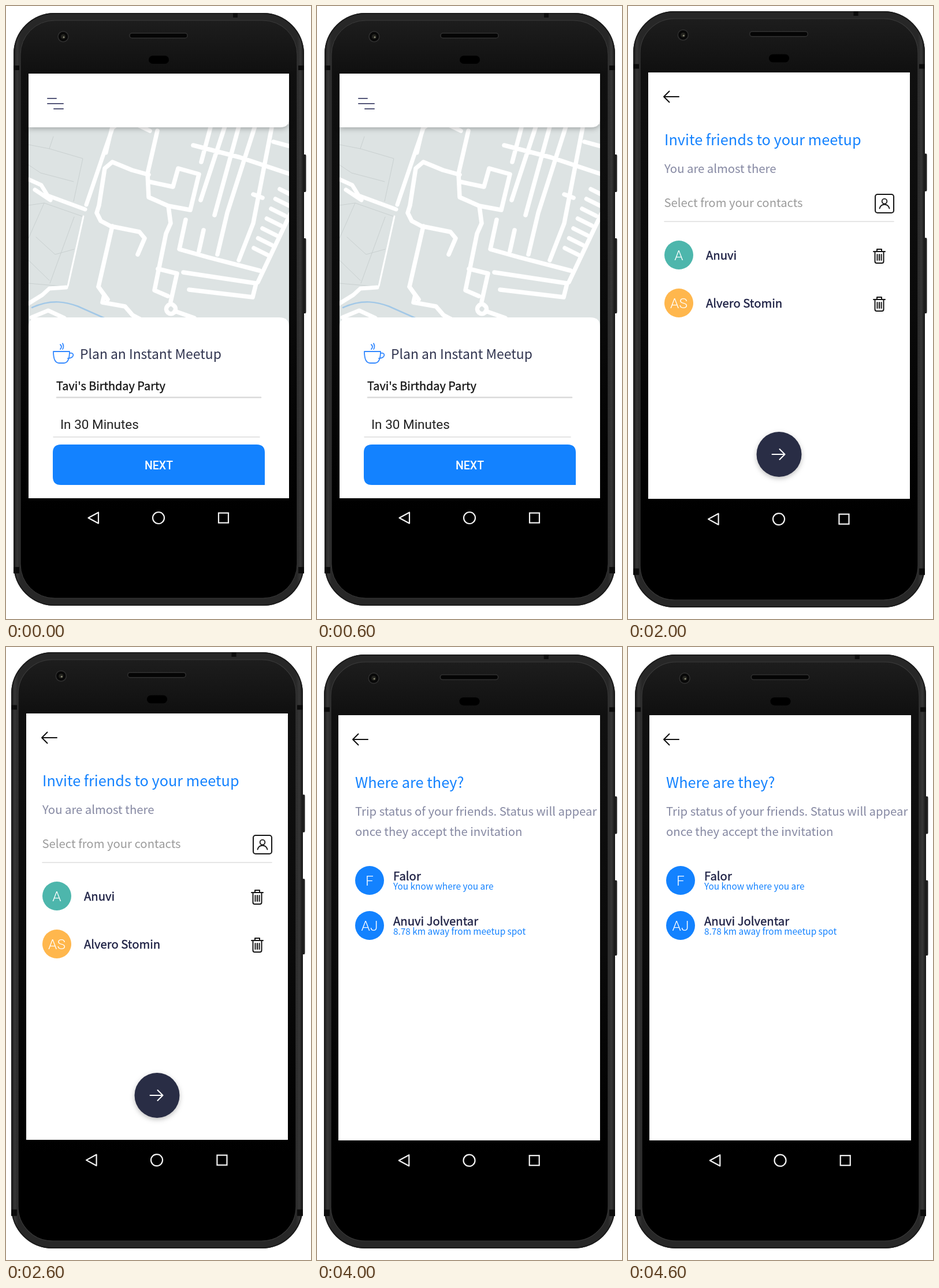
An HTML page that plays this animation: 528x1061 px, repeating every 5 s.

```html
<!DOCTYPE html>
<html lang="en">
<head>
<meta charset="utf-8">
<title>Meetup app walkthrough</title>
<style>
html, body { margin: 0; width: 100%; height: 100%; overflow: hidden; background: #fff; }
#stage { display: block; font-family: "Noto Sans CJK SC", "Noto Sans CJK JP", "Noto Sans CJK", "Open Sans", sans-serif; }
text { stroke-width: 0; }
.r { font-family: Roboto, sans-serif; }
.l { font-weight: 300; }
.m { font-weight: 500; }
.k { stroke-width: .4px; }
.b { font-weight: 700; stroke-width: .8px; }
.mid { text-anchor: middle; }
.end { text-anchor: end; }
.place { font-family: Roboto, sans-serif; stroke: #e6ebeb; stroke-width: 3px; paint-order: stroke; }
.street { font-family: Roboto, sans-serif; stroke: #eef1f1; stroke-width: 3px; paint-order: stroke; }
.line { fill: none; stroke-linecap: round; stroke-linejoin: round; }
.shadow { filter: drop-shadow(0 3px 4px rgba(0, 0, 0, .25)); }
</style>
</head>
<body>
<svg id="stage" width="528" height="1061" viewBox="0 0 528 1061">
  <defs>
    <linearGradient id="glass" x2="0" y2="1">
      <stop offset="0" stop-color="#1d1d1d"/><stop offset=".09" stop-color="#101010"/>
      <stop offset=".5" stop-color="#0a0a0a"/><stop offset=".85" stop-color="#000"/>
    </linearGradient>
    <linearGradient id="rim">
      <stop offset="0" stop-color="#171717"/><stop offset=".012" stop-color="#363636"/>
      <stop offset=".025" stop-color="#272727"/><stop offset=".975" stop-color="#272727"/>
      <stop offset=".988" stop-color="#363636"/><stop offset="1" stop-color="#171717"/>
    </linearGradient>
    <g id="phone">
      <path d="M514 257h4q1.500 0 1.500 3v59q0 3-1.500 3h-4zM514 402h4q1.500 0 1.500 3v124q0 3-1.500 3h-4z" fill="#202020"/>
      <rect x="13" y="12" width="503" height="1026" rx="71" fill="url(#rim)"/>
      <rect x="14" y="13" width="501" height="1024" rx="70" fill="none" stroke="#1b1b1b" stroke-width="2"/>
      <path d="M13 103h10v8H13zM506 103h10v8h-10zM13 971h10v11H13zM506 971h10v11h-10zM393 12h8v8h-8z" fill="#0c0c0c"/>
      <rect x="25" y="25" width="479" height="1000" rx="59" fill="url(#glass)" stroke="#3b3b3b"/>
      <rect x="214" y="47" width="100" height="8.5" rx="4" fill="#050505" stroke="#303030" stroke-width="1.5"/>
      <rect x="247" y="86" width="35" height="14" rx="7" fill="#000"/>
      <circle cx="99" cy="53" r="9" fill="#080808" stroke="#303030" stroke-width="1.5"/>
      <circle cx="99" cy="53" r="4" fill="#24241f"/><circle cx="100" cy="54" r="1.5" fill="#8b8a76"/>
      <g fill="none" stroke="#f2f2f2" stroke-width="2.200">
        <path d="M142.500 886L160 876.500V895.500Z" stroke-linejoin="round"/>
        <circle cx="264" cy="886" r="10"/><rect x="368" y="877.500" width="17" height="17"/>
      </g>
    </g>
  </defs>
</svg>
<script>
const BLUE = '#1382ff', INK = '#292d45', MUTED = '#8588a2', LAND = '#dde3e3', NAVY = '#1d2044';
const TITLE = 25.3, BODY = 20.3, SMALL = 15.4;

const text = (x, y, size, fill, str, cls = '', more = '') =>
  `<text x="${x}" y="${y}" font-size="${size}" fill="${fill}" stroke="${fill}" class="${cls}" ${more}>${str}</text>`;
const line = (d, stroke = '#fff', width = 7, more = '') =>
  `<path class="line" d="${d}" stroke="${stroke}" stroke-width="${width}" ${more}/>`;
const fill = (d, color, more = '') => `<path d="${d}" fill="${color}" ${more}/>`;
const disc = (x, y, r, color, more = '') => `<circle cx="${x}" cy="${y}" r="${r}" fill="${color}" ${more}/>`;
const rect = (x, y, w, h, color, more = '') =>
  `<rect x="${x}" y="${y}" width="${w}" height="${h}" fill="${color}" ${more}/>`;
const crop = (x, y, w, h, body) =>
  `<svg x="${x}" y="${y}" width="${w}" height="${h}" viewBox="${x} ${y} ${w} ${h}">${rect(x, y, w, h, LAND)}${body}</svg>`;
const turned = (x, y, deg) => `transform="rotate(${deg} ${x} ${y})"`;
const street = (x, y, size, str, deg) => text(x, y, size, '#56626a', str, 'street', turned(x, y, deg));
const place = (x, y, size, str, cls = '') => text(x, y, size, '#6895ad', str, 'place ' + cls);
const repeat = (n, f) => Array.from({ length: n }, (_, i) => f(i)).join('');

const back = (x, y) => line(`M${x + 26} ${y}H${x}m9.500-9.500l-9.500 9.500 9.500 9.500`, '#111', 2);
const menu = (x, y) => line(`M${x} ${y}h15M${x} ${y + 9}h27M${x + 11} ${y + 18}h16`, '#56587a', 2);
const header = (x, y, w, h) =>
  fill(`M${x} ${y}h${w}v${h - 15}q0 15-15 15H${x}z`, '#fff', 'class="shadow"');
const nextButton = x => disc(x, 776, 39, INK, 'class="shadow"') +
  line(`M${x - 12} 776h22m-9-9l9 9-9 9`, '#fff', 2);

// Map marker: 'glyph' is drawn in units of a 10px radius around the centre.
const pin = (x, y, r, glyph) => `<g transform="translate(${x} ${y}) scale(${r / 10})">
  <ellipse cx="0" cy="18" rx="5" ry="1.500" fill="#000" opacity=".13"/>
  ${fill('M-10 0a10 10 0 1 1 20 0c0 6-7 8-10 18c-3-10-10-12-10-18z', '#a2a6a8')}${glyph}</g>`;
const glyphs = {
  bag: fill('M-5-2H5V5H-5z', '#fff') + line('M-2.500-2v-2a2.500 2.500 0 0 1 5 0v2', '#fff', 1.3) + line('M-2 0q2 4 4 0', '#999', 1),
  bank: rect(-6, -4, 12, 8, '#fff', 'rx="1"') + line('M-4 0h2M-.500 0h1M2 0h2', '#999', 1.6),
  cup: fill('M-5-4H3V0q0 4-4 4t-4-4zM-5 5H4v1h-9z', '#fff') + line('M3-3h3v3H3', '#fff', 1.2),
  glass: line('M-4-4H4L0 0zM0 0v5M-3 5h6', '#fff', 1.7),
  bed: text(0, 4.5, 12, '#fff', 'H', 'r m mid'),
  house: fill('M-6 5v-7h4v-3h4v3h4v7z', '#fff') + line('M-3 1h1M2 1h1', '#999', 1.5)
};
const busStop = (x, y) => rect(x - 8, y - 8, 16, 16, '#5f94ae', 'rx="2" stroke="#eaf0f2"') +
  rect(x - 4, y - 5, 8, 9, '#fff', 'rx="1"') + rect(x - 3, y - 3, 6, 3, '#5f94ae');

function planScreen() {
  const map = line('M39 345L66 341 135 365M66 341L39 402M39 240L75 247 133 264 117 338M75 247L82 226M39 275L60 289 117 304M118 365L76 480M39 440L75 475M52 400L85 430 118 421M39 480L108 486', '#c9d0d0', 1) +
    line('M134 364L107 485', '#fff', 3) +
    line('M190 195L171 250 139 344M207 195L183 212 173 254M39 300L61 310 72 328 137 352M50 318L77 336M39 515L63 500 75 489 104 487M44 539L73 527 101 540') +
    line('M247 292L218 284 184 270 171 281 161 345 157 358 164 372 181 381 231 391 240 402 228 430M184 381L160 486 170 500 167 513 206 520 219 535 240 546M160 486L176 508', '#fff', 7.5) +
    line('M216 200L249 216M262 216L245 290 247 331 281 346 319 353 334 291 298 281 289 313 247 304M281 346L285 376 277 394 257 492 280 502M263 455L296 463 285 512M279 520a8 8 0 1 0 13 0q-7-8-13 0M292 528L326 540', '#fff', 7.5) +
    line('M324 241L405 262 492 291M354 210L338 270M380 205L337 336M404 205L361 362M432 205L383 358 366 430M461 205L428 376 403 440M492 360L436 478M311 370L300 421 350 435 439 458M342 388L334 424M307 461L433 480 427 504 317 491M428 326L444 332M463 235L492 243', '#fff', 7.5) +
    line(repeat(7, i => `M${474 - 7.5 * i} ${317 + 17 * i}l24 12`), '#fff', 7.5) +
    line('M45 522C80 506 106 513 125 520L170 540', '#a2c8e7', 2.5);
  return crop(39, 205, 451, 350, map) + header(39, 117, 451, 93) + menu(72, 160) +
    fill('M39 852V555q0-16 17-16H473q17 0 17 16V852z', '#fff') +
    line('M82 598H110c0 13-3 20-10 20h-8c-7 0-10-7-10-20M110 601c9-2 9 8-3 9M94 594q4-4 0-8M98 594q3-4 0-10', '#3489ff', 1.8) +
    text(128, 611, 22.9, '#30344f', 'Plan an Instant Meetup') +
    text(87, 665, 19.9, '#161616', "Tavi's Birthday Party", 'k') + line('M88 677.500H441', '#dadada', 2.5) +
    text(94, 732, 22.5, '#222', 'In 30 Minutes', 'r') + line('M82 746H439', '#dcdcdc', 1.5) +
    fill('M95 759H434q14 0 14 14V829H95q-14 0-14-14V773q0-14 14-14z', BLUE) +
    text(264.5, 802, 19.5, '#fff', 'NEXT', 'r m mid');
}

function spotScreen() {
  const map = line('M69 452L112 438 146 452 257 440M92 415L120 462 104 500 69 482M104 500L160 482 257 474M182 421L190 470M215 421L210 472M69 530L118 517 175 520M118 517L132 570 90 588 69 570M132 570L186 560M90 588L100 645 69 660M100 645L148 630 206 640M148 630L138 585M110 690L155 665 218 674M155 665L165 720M183 500L257 508M205 575L262 556M212 605L280 590M216 640L292 625M222 668L262 655 280 690M235 695L318 676M250 640L262 655M240 600L252 632', '#fff', 6) +
    line('M262 462L464 454M262 488L464 480M262 516L464 507M262 567L464 548M312 421L314 540M346 421L350 540M393 421L398 545M425 421L428 505M326 600L464 584M330 566L334 648 302 660M365 560L368 625M410 548L412 598M440 510L444 590', '#fff', 7) +
    line('M384 594L372 655 358 720M415 595L402 655 388 720M440 610L418 720M334 630L464 645M318 656L464 673M336 680L464 704M450 600L440 690M350 640L338 690 356 705M396 640L430 668', '#fff', 5.5) +
    line('M257 415V485L263 563 294 625 354 725', '#fff', 13) +
    line('M146 415L166 482 196 560 210 630 222 680 242 725', '#a9cce4', 7) +
    fill('M271 576L324 564V599L284 601zM290 720L303 709 314 720z', '#9ad876') +
    line('M286 582L309 575 311 596 288 597zM296 579L298 570', '#d7f0c8', 1.3) +
    street(121, 582, 15, 'Professor K V Ond Rd', 79) + street(400, 427, 14.5, 'Oru Cross', 86) +
    street(294, 557, 15, 'il A Main Rd', -4) + street(337, 607, 15, 'Vorn Main Rd', -3) +
    street(370, 710, 15, 'Pel Cross Rd', -80) +
    place(283, 445, 18.1, 'Zuv Hospital', 'end') + place(248, 550, 18.1, 'Steepiva', 'end') +
    pin(302, 442, 10.5, glyphs.bed) + pin(370, 492, 10.5, glyphs.glass) + pin(265.5, 547, 10.5, glyphs.cup) +
    line('M292 548V567', '#f3b407', 3.5) + disc(292, 538, 12.5, '#fdc10b') + disc(292, 532, 3.5, '#fff1bd') +
    disc(118, 696, 13, '#fff');
  return back(68, 163) + text(69, 232, TITLE, BLUE, 'Set the meet-up spot') +
    text(69, 279, BODY, MUTED, 'Where are you planning to meet?') +
    text(69, 327.5, BODY, '#191919', 'Steepiva', 'k') + line('M70 339H449', '#ececec', 2) +
    text(69, 387.5, BODY, '#9d9d9d', 'House No, Floor No, Apartment Name') + line('M70 399H446', '#cfcfcf', 2.5) +
    crop(69, 421, 395, 299, map) + nextButton(266);
}

function inviteScreen() {
  const trash = y => line(`M425 ${y - 8}h20M431 ${y - 8}v-4h8v4M427.500 ${y - 8}V${y + 9}q0 3 3 3h9q3 0 3-3V${y - 8}M431.500 ${y - 3}v10M435 ${y - 3}v10M438.500 ${y - 3}v10`, '#161616', 2);
  const friend = (y, color, initials, name) => disc(88, y, 25, color) +
    text(88, y + 8.5, 24.5, '#fff', initials, 'r l mid') + text(135, y + 7.5, BODY, NAVY, name, 'k') + trash(y + 2);
  return back(62, 157) + text(63, 241, TITLE, BLUE, 'Invite friends to your meetup') +
    text(63, 289, BODY, MUTED, 'You are almost there') +
    text(62.5, 348, BODY, '#9b9b9b', 'Select from your contacts') +
    rect(428, 326, 32, 32, 'none', 'rx="4" stroke="#161616" stroke-width="2"') +
    disc(444, 338, 4.3, 'none', 'stroke="#161616" stroke-width="1.800"') +
    line('M435.500 350.500q2-7 8.500-7t8.500 7', '#161616', 1.8) + line('M63 373H460', '#dedede', 1.6) +
    friend(431, '#4db6ac', 'A', 'Anuvi') + friend(514, '#ffb74d', 'AS', 'Alvero Stomin') + nextButton(261.5);
}

const portrait = (x, y, body) => `<g transform="translate(${x} ${y})">${disc(0, 0, 35.5, '#2e86fa')}${body}</g>`;
const face = line('M-9-3h5M4-3h5', '#5a3b2b', 1.6) + disc(-6, 0, 1.4, '#432') + disc(6, 0, 1.4, '#432') +
  line('M0 0v6h-2', '#d69d74', 1.3) + line('M-4 11q4 2 8 0', '#b7544a', 1.6);
const woman = fill('M-20 24C-22-4-20-29 0-29S22-4 19 24z', '#e7a02f') +
  fill('M-25 25q10-5 17-5H8q7 0 17 5A35.500 35.500 0 0 1-25 25z', '#5c2a32') +
  fill('M-7 12H7V21L0 28-7 21z', '#e2ad82') + fill('M-13-10Q0-23 13-10V4Q11 17 0 18T-13 4z', '#f5cfa5') +
  fill('M-15 1Q-17-24 1-25T15 1Q13-11 1-18Q-7-10-15 1z', '#eeb03d') + fill('M-11 20l6-3 5 9-7 4zM11 20l-6-3-5 9 7 4z', '#fff') + face;
const boy = fill('M-28 22q10-7 20-7H8q10 0 20 7A35.500 35.500 0 0 1-28 22z', '#84b92a') +
  fill('M-7 9H7V18Q0 25-7 18z', '#dfa875') + disc(-15, 0, 3.5, '#eebc8b') + disc(15, 0, 3.5, '#eebc8b') +
  fill('M-15-12H15V3Q12 17 0 18T-15 3z', '#f5c899') +
  fill('M-16-3Q-22-19-10-22Q3-29 13-21Q20-18 16-3L12-12Q-2-8-9-14z', '#5c2930') + face;

function liveScreen() {
  const map = line('M88 205L96 230 154 236 164 205M154 236L148 276 170 285 290 305 322 310M35 273L80 283 92 296 85 320M100 258L151 264M188 245L184 288M180 243L250 254M214 205L207 247M247 205L237 294M272 205L258 300M262 242L320 262M280 270L318 284M287 291L312 302M318 214L300 305 288 380M345 255L310 330M330 262L371 280M317 283L355 302M308 307L344 324M170 285L157 345 124 352M140 370L133 395 150 407 138 420 150 432 198 436 235 458 250 480 264 532M175 357L225 372 300 378M183 320L250 336 296 345', '#fff', 7) +
    line('M138 420L144 400 183 413 233 437 252 455M252 470L262 536 306 584 314 561 270 530', '#fff', 8) +
    line('M366 355L420 375 494 403M455 390L428 448M378 436L353 468 366 480M353 468L330 483M420 430L494 465M404 452L494 508M435 445L465 482M381 520L452 556 494 571M360 552L430 592 494 622M418 540L392 590M450 555L420 625M494 590L458 660M345 590L400 625M336 610L322 650M468 660L494 676M455 686L494 710M300 650L400 690M270 679L355 730 494 785M240 705L315 735 300 792M360 730L336 792M402 700L380 744M410 755L396 792M205 735L300 780', '#fff', 6) +
    line('M35 467L266 541', '#fff', 5) +
    line(repeat(7, i => `M${76 + 28 * i} ${485 + 9 * i}L${i < 3 ? 16 + 28 * i : 28 + 25 * i} ${660 + 22 * i}`), '#fff', 6.5) +
    line('M35 590L55 596M35 690L180 740M35 725L175 770M35 762L132 790M60 660L52 705', '#fff', 6) +
    line('M34 452L240 519', '#a7db84', 16, 'style="stroke-linecap:butt"') +
    line('M35 437L100 456 190 488 245 510', '#fff', 5) + line('M35 442L100 459 180 480 240 513', '#a5c9df', 2) +
    line('M510 274L425 425 340 570 255 676 150 808', '#afc2ca', 31) + line('M510 274L425 425 340 570 255 676 150 808', '#c2d1d7', 28) +
    line('M292 548L318 574 343 592 361 614 369 654 410 696M386 795L410 768 432 758', '#a4c8e5', 2.5) +
    place(455, 236, 19.7, 'Quvor Bank Melisandor,', 'end') + place(455, 260, 19.7, 'Main Road Tarvelund...', 'end') +
    pin(477, 234, 13.5, glyphs.bank) + place(382, 402, 19.7, 'Olno Banking Point', 'end') + pin(403, 389, 13.5, glyphs.bank) +
    ['KV Torulan', 'North', 'City Park'].map((s, i) => place(121, 464 + 24 * i, 19.7, s, 'mid')).join('') +
    place(241, 571, 19.7, 'Lumerels Mall', 'end') + pin(262, 576, 13.5, glyphs.bag) + pin(377, 515, 13.5, glyphs.bag) +
    pin(437, 675, 13.5, glyphs.house) + place(291, 673, 19.7, 'Orvanzel faith') + place(303, 697, 19.7, 'prayer house') +
    street(66, 638, 15, 'Tam Cross Rd', -72) + street(38, 770, 15.5, 'Velmishna Rd', 16) +
    busStop(320, 597) + busStop(172, 743);
  const round = y => disc(431.5, y, 29.5, '#fff', 'class="shadow"');
  const head = (x, y, hair, shirt) => fill(`M${x - 10} ${y + 18}q0-10 10-10t10 10z`, shirt) +
    disc(x, y - 2, 8.5, hair) + disc(x, y + 2, 6.5, '#f6c9a0');
  return crop(35, 200, 459, 592, map) + header(35, 110, 459, 95) + menu(69, 154) +
    portrait(140, 336, woman) + portrait(254.5, 403, boy) +
    round(560) + head(421, 553, '#f3bd3e', '#2d4368') + head(443, 552, '#2d3047', '#3b5680') + head(432, 561, '#ee4c43', '#f07f78') +
    round(646) + disc(431.5, 646, 3, BLUE) +
    [1, -1].map(s => `<g transform="translate(431.500 646) scale(${s} 1)">${line('M5-5q5 5 0 10M9-8q8 8 0 16M13-11q9 11 0 22', BLUE, 2.3)}</g>`).join('') +
    round(732) + fill('M420 734L442 722 432 745 430 735z', BLUE) +
    fill('M80 639H155q14 0 14 14V741H80q-14 0-14-14V653q0-14 14-14z', '#1d82f5', 'class="shadow"') +
    text(118, 701, 27.8, '#fff', 'SOS', 'b mid') + rect(35, 792, 459, 65, BLUE) +
    text(65, 820, 16, '#fff', "Meetup in Tea Solamindur for Tavi's", 'b') +
    text(65, 842, 16, '#fff', 'Birthday at 06:00 PM', 'b') + text(414, 831, 16.2, '#fff', 'EXIT', 'b');
}

function statusScreen() {
  const friend = (y, initials, name, status) => disc(91, y, 25, BLUE) +
    text(91, y + 8.5, 24.5, '#fff', initials, 'r l mid') + text(132, y, BODY, NAVY, name, 'k') +
    text(132, y + 16, SMALL, BLUE, status);
  return back(62, 160) + text(66, 244, TITLE, BLUE, 'Where are they?') +
    text(66, 291.5, BODY, MUTED, 'Trip status of your friends. Status will appear') +
    text(66, 326.5, BODY, MUTED, 'once they accept the invitation') +
    friend(404, 'F', 'Falor', 'You know where you are') +
    friend(482, 'AJ', 'Anuvi Jolventar', '8.78 km away from meetup spot');
}

// body: phone outline x, y, w, h; glass: screen x, y, w, h
const scenes = [
  { body: [13, 12, 503, 1026], glass: [39, 117, 451, 735], draw: planScreen },
  { body: [16, 16, 501, 1022], glass: [41, 121, 450, 732], draw: spotScreen },
  { body: [9, 9, 505, 1032], glass: [35, 115, 453, 738], draw: inviteScreen },
  { body: [9, 4, 511, 1043], glass: [35, 110, 459, 747], draw: liveScreen },
  { body: [12, 13, 504, 1028], glass: [37, 118, 453, 736], draw: statusScreen }
];
const stage = document.getElementById('stage');
const count = scenes.length;

scenes.forEach(({ body: [x, y, w, h], glass, draw }, i) => {
  const g = document.createElementNS(stage.namespaceURI, 'g');
  g.innerHTML = `<use href="#phone" transform="translate(${x} ${y}) scale(${w / 503} ${h / 1026}) translate(-13 -12)"/>` +
    rect(...glass, '#fff') + draw();
  stage.append(g);
  g.animate([
    { opacity: 1, offset: 0 }, { opacity: 1, offset: 1 / count },
    { opacity: 0, offset: 1 / count }, { opacity: 0, offset: 1 }
  ], { duration: 1000 * count, iterations: Infinity, iterationStart: (count - i) % count / count });
});
</script>
</body>
</html>
```
